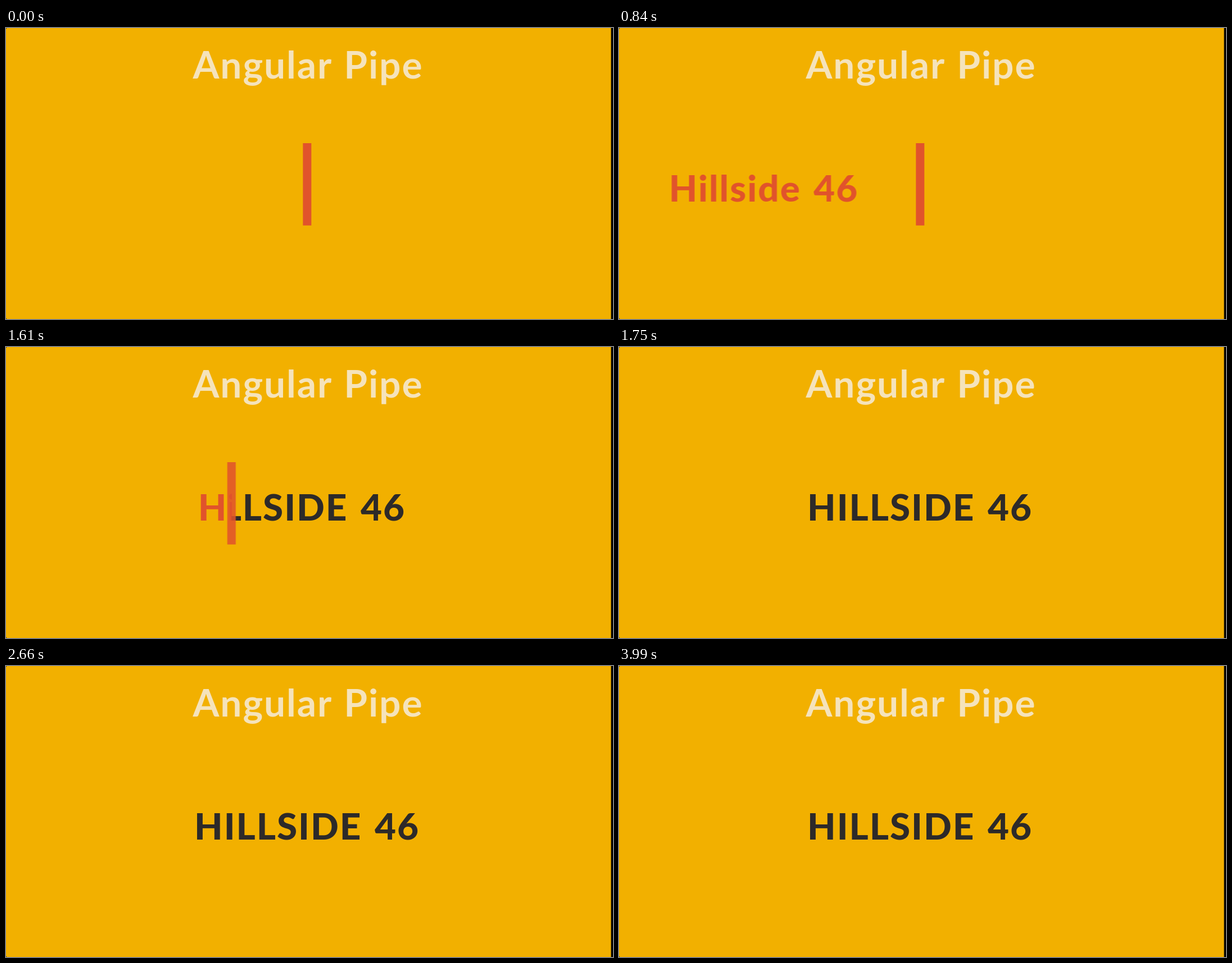
Write an HTML page that moves like this. It is 1080x518 px and loops after 4060 ms.

```html
<!DOCTYPE html>
<html lang="en">
<head>
<meta charset="utf-8">
<title>Angular Pipe</title>
<style>
  html, body { margin: 0; width: 100%; height: 100%; overflow: hidden; background: #000; }
  svg { display: block; width: 100%; height: 100%; }
  text { font-family: Lato, "Open Sans", sans-serif; text-anchor: middle; letter-spacing: 2px; }
  .title { font-size: 67.5px; font-weight: 700; word-spacing: 3px; fill: #f5e3bb; }
  .word { font-size: 65.5px; font-weight: 800; word-spacing: 5px; animation: slide 4060ms infinite; }
  .before { fill: #e1532b; }
  .after { fill: #2d2a29; }
  .pipe { fill: #e1532b; animation: sweep 4060ms infinite, fade 4060ms linear infinite; }
  .edge { animation: sweep 4060ms infinite; }

  /* the word enters, waits, then passes through the pipe to the centre */
  @keyframes slide {
    0% { transform: translateX(-170px); }
    4.433% { transform: translateX(-170px); animation-timing-function: cubic-bezier(.645, .045, .355, 1); }
    11.724% { transform: translateX(256.5px); }
    33.99% { transform: translateX(256.5px); animation-timing-function: cubic-bezier(.645, .045, .355, 1); }
    41.872%, 100% { transform: translateX(534.5px); }
  }
  /* the pipe and both clip edges travel together */
  @keyframes sweep {
    0% { transform: translateX(0); }
    36.207% { transform: translateX(0); animation-timing-function: ease-in-out; }
    42.611%, 100% { transform: translateX(-235px); }
  }
  @keyframes fade {
    0%, 37.931% { opacity: 1; }
    39.655% { opacity: .88; }
    42.365%, 100% { opacity: 0; }
  }
</style>
</head>
<body>
<svg viewBox="0 0 1080 518">
  <defs>
    <clipPath id="left"><rect class="edge" x="-664" y="0" width="1200" height="518"/></clipPath>
    <clipPath id="right"><rect class="edge" x="536" y="0" width="1200" height="518"/></clipPath>
  </defs>
  <path fill="#f2b000" d="M2 0H1076.5V518H2Q0 518 0 516V2Q0 0 2 0Z"/>
  <text class="title" x="537.5" y="90">Angular Pipe</text>
  <g clip-path="url(#left)"><text class="word before" x="1" y="308.5">Hillside 46</text></g>
  <g clip-path="url(#right)"><text class="word after" x="1" y="308.5">HILLSIDE 46</text></g>
  <rect class="pipe" x="528.3" y="205" width="15" height="146.5"/>
</svg>
</body>
</html>
```
